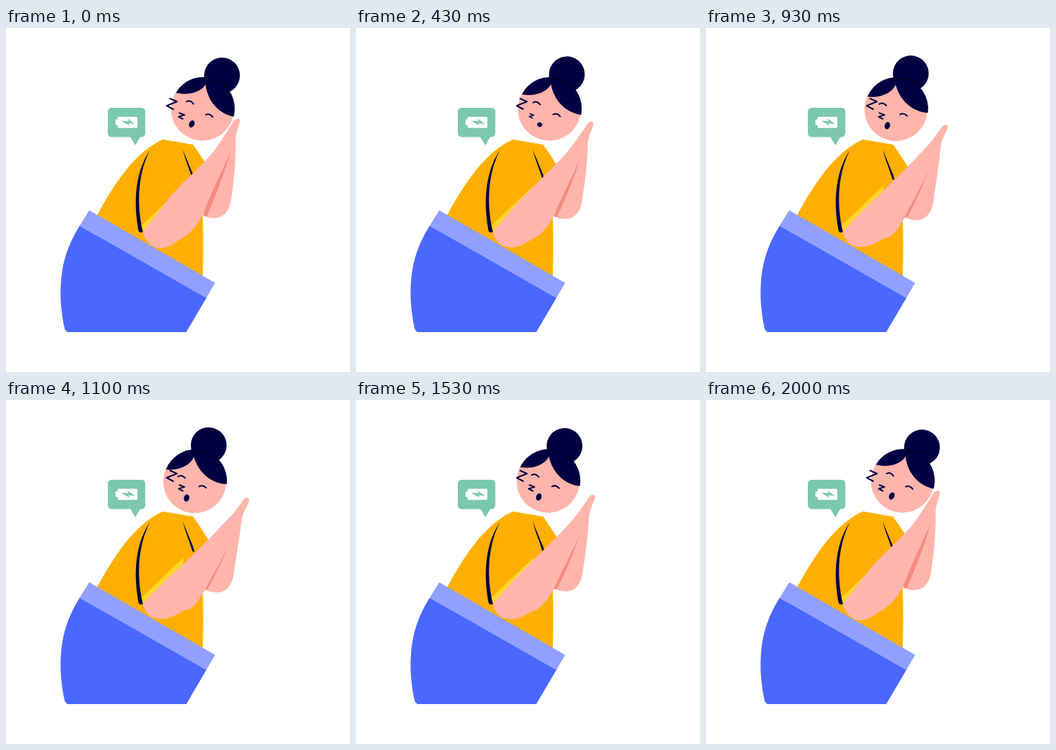
Recreate the animation shown at these times as an HTML page. Size 500 by 500 pixels, loop 2030 ms.

```html
<!DOCTYPE html>
<html lang="en">
<head>
<meta charset="utf-8">
<title>Sleepy</title>
<style>
  html, body { margin: 0; width: 100%; height: 100%; overflow: hidden; background: #fff; }
  svg { display: block; width: 100%; height: 100%; }
  .skin { fill: #ffb5ab; }
  .ink { fill: #020041; }
  .line { fill: none; stroke: #020041; stroke-width: 2; stroke-linecap: round; stroke-linejoin: round; }
</style>
</head>
<body>
<svg viewBox="0 0 500 500">
  <!-- speech bubble with battery -->
  <g fill="#7cc7b0">
    <rect x="148" y="116" width="54.5" height="42.5" rx="5.5"/>
    <path d="M180 157L188 170.500L196 157Z"/>
    <g fill="#fff">
      <rect x="162" y="129" width="29" height="16.300" rx="2"/>
      <rect x="159" y="133" width="5" height="8" rx="1.500"/>
    </g>
    <path d="M167 134.500L178 135.500L176.500 131.500L187.500 139.500L178 138.500L179.500 142Z"/>
  </g>

  <!-- head -->
  <g id="head">
    <circle class="skin" cx="285.500" cy="118" r="45.700"/>
    <path class="ink" d="M247 94A45.900 45.900 0 0 1 331 129C310 125 293 107 290 82C284 93 265 99 247 94Z"/>
    <circle class="ink" cx="314" cy="69" r="26"/>
    <path d="M289 73Q312 75 326 92" fill="none" stroke="#000" stroke-width="1"/>
    <path class="line" d="M262.500 107Q268 104 272.500 110.500M290.500 126Q296 123.500 300.500 129.500"/>
    <ellipse id="mouth" class="ink" rx="3.900" ry="5.400"/>
  </g>
  <path class="line" d="M238.500 102.500L248.500 107L233.500 113L243 118"/>
  <path id="smallZ" class="line" d="M-3 -4.200L4.500 -1.300L-4.200 1.300L2 4.400"/>

  <!-- body -->
  <path fill="#ffaf00" d="M228 162L272 169.500Q285 188 294 203C288 235 286 255 286 276Q287.500 320 285.500 375L130 280L132 273C158 225 188 180 228 162Z"/>
  <path class="ink" d="M257 177C261 187 267 201 272 213L274 221L271 220C267 206 260 190 257 177Z"/>
  <path fill="#fcd62b" d="M196 288L258 229L257 250L201 298Z"/>
  <path class="ink" d="M209 178C195 198 182 236 192.500 294Q194 299 199 296.500C188 250 194 207 209 178Z"/>
  <path fill="#4a68ff" d="M107 287.500C87 320 78 350 79.500 395Q81 420 85.500 438L89 442H262L292 391Z"/>
  <path fill="#91a0ff" d="M121 265L304 370.500L291 392.500L107 287.500Z"/>

  <!-- arms -->
  <path id="backArm" class="skin"/>
  <path id="shade" fill="#f58b80"/>
  <path id="frontArm" class="skin"/>
</svg>
<script>
const LOOP = 2030, PEAK = 1140, REST = 2005;
const MAX_TILT = 9.5;
const LEANED = 0.85; // lean at which the second arm pose is reached

const poses = {
  backArm: [
    'M333 150C335 180 333 215 327 250C324 272 310 278 297 276Q290 275 286 270L300 200Z',
    'M341 163C342 185 335 220 331 250C328 275 314 281 303 279Q294 279 288 274L300 220Z'
  ],
  shade: [
    'M327 177C316 205 300 235 285 262L287 273L292 274C303 247 318 212 327 177Z',
    'M323 207C312 230 298 252 285 270L288 276L293 275C303 255 315 233 323 207Z'
  ],
  frontArm: [
    'M199 296C215 277 228 258 244 239C262 220 283 201 299 183C309 170 319 154 331 135Q337 129 340 134C340 140 334 150 333 166L327 177C316 205 297 240 287 270C278 288 265 302 250 309C238 319 222 325 210 315Q201 307 199 296Z',
    'M199 296C217 277 234 258 254 241C272 222 295 202 314 180C322 172 330 164 344 143Q350 138 352 144C351 151 342 161 341 177L323 207C312 235 297 258 288 277C280 290 272 304 260 306C249 308 238 325 210 315Q201 307 199 296Z'
  ]
};

const byId = id => document.getElementById(id);
const numbers = path => path.match(/\d+/g).map(Number);

function blend([from, to], k) {
  const end = numbers(to);
  let i = 0;
  return from.replace(/\d+/g, n => (+n + (end[i++] - n) * k).toFixed(2));
}

// Linear rise and fall between start and end, 1 at peak
function ramp(t, start, peak, end) {
  const v = t < peak ? (t - start) / (peak - start) : (end - t) / (end - peak);
  return Math.max(0, v);
}

function draw(t) {
  const lean = ramp(t, 0, PEAK, REST);
  const breath = ramp(t, 30, 280, 580);

  byId('head').setAttribute('transform', `rotate(${-MAX_TILT * lean} 284 188)`);
  byId('mouth').setAttribute('transform',
    `translate(270 139.5) rotate(24) scale(${1 - 0.12 * breath} ${1 - 0.8 * breath})`);
  byId('smallZ').setAttribute('transform', `translate(255 127.7) scale(${1 - 0.5 * breath})`);
  for (const id in poses) byId(id).setAttribute('d', blend(poses[id], lean / LEANED));
}

const start = performance.now();
function tick() {
  draw((performance.now() - start) % LOOP);
  requestAnimationFrame(tick);
}
tick();
</script>
</body>
</html>
```
